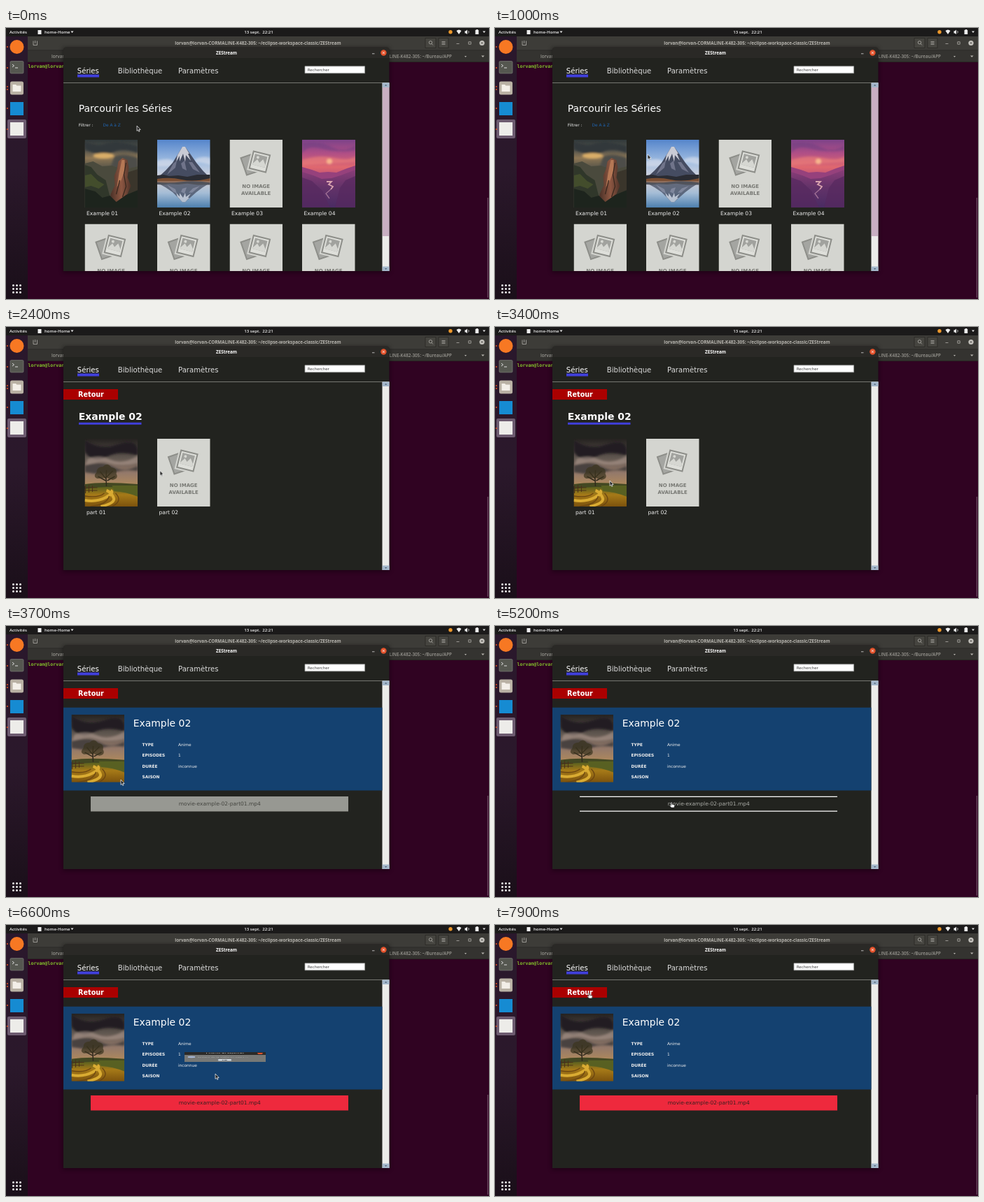
These frames come from a looping animation (690 by 388 pixels, 8 s). An HTML page:

```html
<!DOCTYPE html>
<html lang="fr">
<head>
<meta charset="utf-8">
<title>ZEStream</title>
<style>
html, body { margin: 0; width: 100%; height: 100%; overflow: hidden; background: #300322; }
svg { display: block; width: 100%; height: 100%; }
text { font-family: "DejaVu Sans", sans-serif; fill: #eee; white-space: pre; }
.ui text, text.ui { font-family: "Open Sans", "Noto Sans", sans-serif; font-weight: 600; }
.ui text.bold, text.bold { font-weight: 700; }
.mid { text-anchor: middle; }
.end { text-anchor: end; }
.bold { font-weight: 700; }
.tab { font-size: 10.1px; fill: #ddd; }
.h1 { font-size: 13.95px; fill: #fff; }
.cap { font-size: 7.6px; }
.small { font-size: 5.85px; }
.file { font-size: 7.5px; }

/* Hard switches between states */
.list, .part, .detail, .idle, .hover, .played, .arrow, .hand, .blur { animation: 8s step-end infinite; }
.list { animation-name: list; }
.part { animation-name: part; }
.detail { animation-name: detail; }
.idle { animation-name: idle; }
.hover { animation-name: hover; }
.played { animation-name: played; }
.arrow { animation-name: arrow; }
.hand { animation-name: hand; }
.blur { animation-name: blur; }
@keyframes list { 0% { opacity: 1 } 25% { opacity: 0 } }
@keyframes part { 0% { opacity: 0 } 25% { opacity: 1 } 46.2% { opacity: 0 } }
@keyframes detail { 0% { opacity: 0 } 46.2% { opacity: 1 } }
@keyframes idle { 0% { opacity: 1 } 57.5% { opacity: 0 } }
@keyframes hover { 0% { opacity: 0 } 57.5% { opacity: 1 } 81.25% { opacity: 0 } }
@keyframes played { 0% { opacity: 0 } 81.25% { opacity: 1 } }
@keyframes arrow { 0% { opacity: 1 } 22.4% { opacity: 0 } 25% { opacity: 1 } 57.5% { opacity: 0 } 73.75% { opacity: 1 } 97.5% { opacity: 0 } }
@keyframes hand { 0% { opacity: 0 } 57.5% { opacity: 1 } 73.75% { opacity: 0 } 97.5% { opacity: 1 } }
@keyframes blur { 0% { opacity: 0 } 70% { opacity: 1 } 82.4% { opacity: 0 } }

.dialog { transform-origin: 313px 189px; animation: dialog 8s linear infinite; }
@keyframes dialog {
  0%, 68.74% { transform: scaleY(0); }
  70% { transform: scaleY(.7); }
  71.25%, 81.25% { transform: scaleY(1); }
  82.4%, 83.7% { transform: scaleY(.24); }
  83.75%, 100% { transform: scaleY(0); }
}

.cursor { animation: cursor 8s linear infinite; }
@keyframes cursor {
  0%, 1.25% { transform: translate(187px, 140px); }
  11.25% { transform: translate(214px, 176px); }
  20%, 27.5% { transform: translate(242px, 209px); }
  30% { transform: translate(220px, 205.5px); }
  35%, 47.5% { transform: translate(164px, 220px); }
  57.5% { transform: translate(240px, 247px); }
  60%, 72.5% { transform: translate(252px, 252px); }
  77.5%, 81.25% { transform: translate(305px, 208px); }
  82.5%, 87.5% { transform: translate(299px, 213px); }
  91.25%, 93.75% { transform: translate(180px, 146px); }
  98.75%, 100% { transform: translate(134.5px, 97px); }
}
</style>
</head>
<body>
<svg viewBox="0 0 690 388">
<defs>
  <linearGradient id="dock" x2="0" y2="1">
    <stop stop-color="#2a182c"/><stop offset=".5" stop-color="#2b182b"/><stop offset="1" stop-color="#1a0f19"/>
  </linearGradient>
  <linearGradient id="stormSky" x2="0" y2="1">
    <stop stop-color="#30383a"/><stop offset=".16" stop-color="#58564e"/><stop offset=".27" stop-color="#8d7654"/><stop offset=".42" stop-color="#565449"/>
  </linearGradient>
  <linearGradient id="rock">
    <stop stop-color="#472f26"/><stop offset=".55" stop-color="#8d5742"/><stop offset="1" stop-color="#4e3228"/>
  </linearGradient>
  <linearGradient id="blueSky" x2="0" y2="1">
    <stop stop-color="#5585cb"/><stop offset=".55" stop-color="#a3bfe2"/><stop offset="1" stop-color="#dfd8da"/>
  </linearGradient>
  <linearGradient id="lake" x2="0" y2="1">
    <stop stop-color="#cfcbd2"/><stop offset=".45" stop-color="#a5bdd6"/><stop offset="1" stop-color="#4d7fae"/>
  </linearGradient>
  <linearGradient id="pinkSky" x2="0" y2="1">
    <stop stop-color="#7d4389"/><stop offset=".35" stop-color="#b04f86"/><stop offset=".7" stop-color="#e0686f"/><stop offset="1" stop-color="#b64c79"/>
  </linearGradient>
  <linearGradient id="purpleHill" x2="0" y2="1">
    <stop stop-color="#8a3d78"/><stop offset=".45" stop-color="#643369"/><stop offset="1" stop-color="#4a2b63"/>
  </linearGradient>
  <linearGradient id="duskSky" x2="0" y2="1">
    <stop stop-color="#252220"/><stop offset=".4" stop-color="#5f564f"/><stop offset=".72" stop-color="#94796a"/><stop offset="1" stop-color="#b18a5b"/>
  </linearGradient>
  <linearGradient id="field" x2="0" y2="1">
    <stop stop-color="#59601f"/><stop offset=".4" stop-color="#a67a18"/><stop offset="1" stop-color="#7c520d"/>
  </linearGradient>
  <filter id="soft"><feGaussianBlur stdDeviation="1.5"/></filter>
  <filter id="haze"><feGaussianBlur stdDeviation=".6"/></filter>
  <filter id="shade" x="-10%" y="-10%" width="120%" height="120%"><feGaussianBlur stdDeviation="3"/></filter>
  <clipPath id="page"><path d="M82 79H537.5V348H82z"/></clipPath>

  <symbol id="canyon" viewBox="0 0 75.5 97">
    <path fill="url(#stormSky)" d="M0 0H76V97H0z"/>
    <g filter="url(#soft)">
      <path fill="#30373a" d="M0 3Q20 10 32 5T76 9V19Q55 11 40 18T0 14z"/>
      <ellipse cx="27" cy="23" rx="15" ry="4" fill="#d9ad68"/>
      <path fill="#4d4e49" d="M42 24Q55 18 76 26V42H36z"/>
    </g>
    <g filter="url(#haze)">
      <path fill="#4a4a3d" d="M0 34L12 31 25 38 39 37 55 43 76 38V97H0z"/>
      <path fill="#30372a" d="M0 36L9 39 18 50 30 58 40 97H0z"/>
      <path fill="#434d2c" d="M0 51L9 49 19 59 28 64 20 70 9 66 0 68z"/>
      <path fill="#3a352b" d="M57 48L76 42V97H46z"/>
      <path fill="url(#rock)" d="M48 31L54 26 61 29 63 40 61 54 66 66 60 80 48 91 36 92 37 78 43 65 42 52 46 42z"/>
      <path fill="#b57855" d="M53 29L57 29 57 44 52 58 46 68 49 48z"/>
      <path fill="none" stroke="#39281f" stroke-width="1.3" d="M59 33L56 50 59 67 54 82M50 58L45 78"/>
      <path fill="#1d241d" d="M0 70L15 74 25 83 36 80 45 89 59 79 76 72V97H0z"/>
    </g>
  </symbol>

  <g id="peak">
    <path fill="#454c61" d="M0 55L12 44 22 33 30 20 36 10 40 10 47 20 56 33 65 44 76 55z"/>
    <path fill="#c9cbd5" d="M36 10L40 10 46 20 44 20 48 30 41 22 40 32 37 20 32 31 32 23 27 32 29 22z"/>
    <path fill="#70748a" d="M23 34L28 30 26 40 14 50zM45 32L50 32 61 47 51 42zM34 34L39 30 42 44 36 41z"/>
    <path fill="#2a2c33" d="M0 51L9 50 17 52 30 51 43 53 57 50 76 50V59H0z"/>
    <path fill="#7b4f33" d="M0 56Q18 53 35 57T76 55V59H0z"/>
  </g>
  <symbol id="mountain" viewBox="0 0 75.5 97">
    <path fill="url(#blueSky)" d="M0 0H76V59H0z"/>
    <path fill="#e7e6ec" opacity=".5" filter="url(#soft)" d="M0 30Q17 25 24 31T15 38H0zM54 28Q65 22 76 26V36Q62 31 54 33z"/>
    <path fill="url(#lake)" d="M0 59H76V97H0z"/>
    <g filter="url(#haze)">
      <use href="#peak"/>
      <use href="#peak" transform="matrix(1 0 0 -.62 0 95.5)" opacity=".75"/>
    </g>
  </symbol>

  <symbol id="sunset" viewBox="0 0 75.5 97">
    <path fill="url(#pinkSky)" d="M0 0H76V56H0z"/>
    <g filter="url(#soft)">
      <path fill="#6c3d82" opacity=".5" d="M0 5Q25 1 42 10T76 8V15Q49 19 28 13T0 20z"/>
      <path fill="#ee8078" opacity=".6" d="M0 29Q25 21 46 26T76 24V32Q48 33 0 37z"/>
      <circle cx="39" cy="31" r="4" fill="#f8b58d"/>
    </g>
    <g filter="url(#haze)">
      <path fill="#96417c" d="M0 39L14 43 25 47 37 46 49 47 64 41 76 37V97H0z"/>
      <path fill="url(#purpleHill)" d="M0 46L16 51 28 56 42 55 55 51 76 43V97H0z"/>
      <path fill="#56295f" opacity=".7" d="M0 54L14 59 29 73 40 97H0zM76 52L62 58 54 69 47 97H76z"/>
      <path fill="none" stroke="#d9a4af" stroke-width="1.8" d="M35 60H42L38 64 44 67 41 71"/>
      <path fill="none" stroke="#a27196" stroke-width="1.3" d="M41 71L34 77 39 84"/>
    </g>
  </symbol>

  <symbol id="tree" viewBox="0 0 75.5 97">
    <path fill="url(#duskSky)" d="M0 0H76V68H0z"/>
    <g filter="url(#soft)">
      <path fill="#201e20" d="M0 2Q23 17 47 8T76 14V24Q49 16 31 26T0 19z"/>
      <path fill="#a8948a" opacity=".65" d="M4 29Q20 22 37 30T76 24V35Q52 40 34 35T0 42z"/>
      <path fill="#4a4340" d="M0 38Q24 31 40 40T76 39V46Q56 43 43 48T0 48z"/>
    </g>
    <g filter="url(#haze)">
      <path fill="#434822" d="M0 65Q25 61 76 65V79H0z"/>
      <path fill="none" stroke="#30291c" stroke-width="1.5" d="M31 68Q30 57 31 45M31 58L22 47M31 55L40 46M30 60L19 54M32 60L43 54"/>
      <path fill="#3c351f" opacity=".72" d="M18 57Q11 54 17 48 17 40 26 40 32 33 38 41 47 42 45 50 49 57 40 59L31 56z"/>
      <path fill="url(#field)" d="M0 72Q35 65 76 74V97H0z"/>
      <path fill="#586022" d="M39 67H76V83Q59 76 42 75z"/>
      <path fill="none" stroke="#d9ab32" stroke-width="4" d="M0 88Q17 91 30 84T37 74M23 97Q45 92 41 84T31 74"/>
      <path fill="none" stroke="#6d4711" stroke-width="1.4" d="M0 82Q20 85 28 78M8 97Q32 94 35 82M39 97Q55 89 44 78"/>
      <path fill="none" stroke="#4b3019" d="M1 67V78M6 66V77M11 67V76M0 70H18M0 74H18"/>
    </g>
  </symbol>

  <symbol id="empty" viewBox="0 0 75.5 97">
    <path fill="#d4d5d0" d="M0 0H76V97H0z"/>
    <g stroke="#8d8e89" stroke-width="2">
      <path fill="#a4a5a1" transform="rotate(-19 30 36)" d="M20 22H44V48H20z"/>
      <g transform="rotate(14 43 31)">
        <path fill="#d4d5d0" stroke="#d4d5d0" stroke-width="4" d="M30 18H56V45H30z"/>
        <path fill="#dedfda" d="M31 19H55V44H31z"/>
        <path fill="#a1a29e" stroke="none" d="M34 22H52V38H34z"/>
        <path fill="#d6d7d2" stroke="none" d="M34 36L39 29 43 33 47 27 52 34V38H34z"/>
        <circle cx="39" cy="26" r="2" fill="#d6d7d2" stroke="none"/>
      </g>
    </g>
    <g class="mid bold" font-size="7">
      <text x="37.7" y="69" style="fill:#777873">NO IMAGE</text>
      <text x="37.7" y="78.5" style="fill:#777873">AVAILABLE</text>
    </g>
  </symbol>
</defs>

<!-- Desktop and terminal -->
<path fill="#300322" d="M0 0H690V388H0z"/>
<path fill="#3d3c38" d="M31 12H690V48.5H31z"/>
<path fill="#343330" d="M31 32H690V48.5H31z"/>
<path fill="#282724" d="M31 31.5H690V32.2H31zM31 48H690V49H31z"/>
<g class="ui" font-size="6.3">
  <text class="mid bold" x="360" y="23.5" style="fill:#b9b7b1">lorvan@lorvan-CORMALINE-K482-305: ~/eclipse-workspace-classic/ZEStream</text>
  <text x="65" y="42.5" style="fill:#9a9892">lorvan@lorvan-CORMALINE-K482-305: ~</text>
  <text class="end" x="637" y="42.5" style="fill:#9a9892">lorvan@lorvan-CORMALINE-K482-305: ~/Bureau/APP</text>
</g>
<g fill="none" stroke="#b4b2ac" stroke-width=".8">
  <path fill="#464540" stroke="#292824" d="M599 14.5H614V28.5H599zM618 14.5H632V28.5H618z"/>
  <path d="M39 18.5V24.5H44.5V18.5M41.7 18V22M622.5 19.5H627.5M622.5 21.5H627.5M622.5 23.5H627.5M643.5 22.5H647.5M660.8 19.8H664.2V23.2H660.8zM608 22.5L610 24.5"/>
  <circle cx="606.5" cy="20.8" r="2.2"/>
  <circle cx="680" cy="21.5" r="3.6" fill="#c9c7c2" stroke="none"/>
  <path stroke="#3d3c38" d="M678.6 20.1L681.4 22.9M681.4 20.1L678.6 22.9"/>
  <path fill="#b4b2ac" stroke="none" d="M679 39.5H683.5L681.2 42zM655 40H658L656.5 42z"/>
</g>
<text x="31.5" y="56.5" class="bold" font-size="6.6" style="font-family:'DejaVu Sans Mono',monospace;fill:#83c42c">lorvan@lorvan</text>
<path fill="#6b4860" d="M687.7 243H689V386H687.7z"/>

<!-- Top bar -->
<path fill="#1b1a1a" d="M0 0H690V12H0z"/>
<g class="ui" font-size="6.1">
  <text x="5" y="8.2">Activités</text>
  <text x="55" y="8.2">home-Home</text>
  <text class="mid" x="361" y="8.2">13 sept.  22:21</text>
</g>
<g fill="#eee">
  <path d="M45.5 3H50.5V9H45.5zM92.5 4.5H96.5L94.5 7zM681 4.5H685L683 7zM643.5 4Q647 .8 650.5 4L647 9zM655.5 4.2H657L659 2.5V9L657 7.5H655.5z"/>
  <path fill="none" stroke="#eee" stroke-width=".8" d="M660.5 4Q662 5.7 660.5 7.5"/>
  <path d="M670.5 2.8H672V2H674V2.8H675.2V9H670.5z"/>
  <circle cx="635" cy="5.7" r="2.7" fill="#ed982b"/>
</g>

<!-- Dock -->
<path fill="url(#dock)" d="M0 12H31V388H0z"/>
<rect x="2" y="131" width="27" height="27" rx="2" fill="#6d5b70"/>
<circle cx="15.5" cy="27" r="10" fill="#f77823"/>
<rect x="6" y="47.5" width="19" height="17.5" rx="1.5" fill="#555750" stroke="#858681" stroke-width=".6"/>
<path fill="none" stroke="#eee" stroke-width=".9" d="M9 52L11.5 54 9 56M13 57H17"/>
<rect x="6" y="76.5" width="19" height="19" rx="2.5" fill="#b9b1a4"/>
<path fill="#f3efe8" d="M9.5 81H14L15.5 82.5H21.5V91H9.5z"/>
<rect x="6" y="106" width="19" height="19" fill="#168bd2"/>
<rect x="6" y="135" width="19" height="19" fill="#edece9"/>
<g fill="#e65324">
  <circle cx="2" cy="27" r="1"/><circle cx="2" cy="57" r="1"/><circle cx="2" cy="84" r="1"/>
  <circle cx="2" cy="88" r="1"/><circle cx="2" cy="115" r="1"/><circle cx="2" cy="145" r="1"/>
</g>
<path fill="none" stroke="#eee" stroke-width="3" stroke-linecap="round" stroke-dasharray="0 5" d="M10.5 368.5H21M10.5 373.5H21M10.5 378.5H21"/>

<!-- Application window -->
<rect x="81" y="28" width="467" height="322" opacity=".4" filter="url(#shade)"/>
<path fill="#22231f" d="M82 348V32Q82 27.5 86.5 27.5H543Q547.5 27.5 547.5 32V348z"/>
<path fill="#2a2926" d="M82 43V32Q82 27.5 86.5 27.5H543Q547.5 27.5 547.5 32V43z"/>
<text class="ui mid bold" x="315" y="38.2" font-size="6.3" style="fill:#fff">ZEStream</text>
<path stroke="#ddd" stroke-width=".8" d="M523 36.8H526.5"/>
<circle cx="539.4" cy="35.5" r="4.2" fill="#e4532c"/>
<circle class="blur" cx="539.4" cy="35.5" r="4.2" fill="#4b4945"/>
<path stroke="#fff" stroke-width=".8" d="M537.9 34L540.9 37M540.9 34L537.9 37"/>
<text class="tab" x="101.8" y="65.2" style="fill:#fff">Séries</text>
<text class="tab" x="159.8" y="65.2">Bibliothèque</text>
<text class="tab" x="246" y="65.2">Paramètres</text>
<path fill="#403fdc" d="M102 66.5H133V70.5H102z"/>
<path fill="#fff" stroke="#999" stroke-width=".8" d="M427 54.8H512.6V64.8H427z"/>
<text x="430.7" y="61.8" font-size="5.5" style="fill:#444">Rechercher</text>
<path fill="#777872" d="M82 78H547.5V78.9H82z"/>
<path fill="#ececea" d="M537.5 78.5H547.5V348H537.5z"/>
<path class="list" fill="#c8afc2" d="M538 85H547V298H538z"/>
<path fill="#a4b7cb" d="M537.8 78.5H547.5V85H537.8zM537.8 341.5H547.5V348H537.8z"/>
<path fill="#536578" d="M541 82.7H544.4L542.7 80.8zM541 344H544.4L542.7 346z"/>

<g clip-path="url(#page)">
  <g class="list">
    <text class="h1" x="103.8" y="119.7">Parcourir les Séries</text>
    <text class="small" x="103.8" y="141">Filtrer :</text>
    <text class="small" x="138.5" y="141" style="fill:#2065b3">De A à Z</text>
    <use href="#canyon" x="112.5" y="160" width="75.5" height="97"/>
    <use href="#mountain" x="216" y="160" width="75.5" height="97"/>
    <use href="#empty" x="319.5" y="160" width="75.5" height="97"/>
    <use href="#sunset" x="423" y="160" width="75.5" height="97"/>
    <text class="cap" x="115" y="268.3">Example 01</text>
    <text class="cap" x="218.5" y="268.3">Example 02</text>
    <text class="cap" x="322" y="268.3">Example 03</text>
    <text class="cap" x="425.5" y="268.3">Example 04</text>
    <use href="#empty" x="112.5" y="280.5" width="75.5" height="97"/>
    <use href="#empty" x="216" y="280.5" width="75.5" height="97"/>
    <use href="#empty" x="319.5" y="280.5" width="75.5" height="97"/>
    <use href="#empty" x="423" y="280.5" width="75.5" height="97"/>
  </g>

  <g class="part">
    <g id="back">
      <path fill="#aa0000" d="M82 89H160V104H82z"/>
      <text class="mid bold" x="121.5" y="99.9" font-size="9.65" style="fill:#fff">Retour</text>
    </g>
    <text class="h1 bold" x="103.8" y="133">Example 02</text>
    <path fill="#403fdc" d="M104 136.8H193.5V139.8H104z"/>
    <use href="#tree" x="112.5" y="160" width="75.5" height="97"/>
    <use href="#empty" x="216" y="160" width="75.5" height="97"/>
    <text class="cap" x="115" y="268.3">part 01</text>
    <text class="cap" x="218.5" y="268.3">part 02</text>
  </g>

  <g class="detail">
    <use href="#back"/>
    <path fill="#144170" d="M82 116.7H537.5V235.5H82z"/>
    <use href="#tree" x="93.5" y="126.8" width="75.5" height="97"/>
    <text class="h1" x="181.7" y="143.7">Example 02</text>
    <g class="bold">
      <text class="small" x="194.5" y="172.4">TYPE</text>
      <text class="small" x="194.5" y="187.4">EPISODES</text>
      <text class="small" x="194.5" y="202.6">DURÉE</text>
      <text class="small" x="194.5" y="217.6">SAISON</text>
    </g>
    <text class="small" x="246" y="172.4">Anime</text>
    <text class="small" x="246" y="187.4">1</text>
    <text class="small" x="246" y="202.6">inconnue</text>
    <g class="idle">
      <path fill="#979892" d="M121 244H489V265.5H121z"/>
      <text class="file mid" x="305.3" y="257.4" style="fill:#454641">movie-example-02-part01.mp4</text>
    </g>
    <g class="hover">
      <path fill="#fff" d="M121 243.8H489V245.1H121zM121 264.4H489V265.7H121z"/>
      <text class="file mid" x="305.3" y="257.4" style="fill:#aaaba6">movie-example-02-part01.mp4</text>
    </g>
    <g class="played">
      <path fill="#ee293d" d="M121 244H489V265.5H121z"/>
      <text class="file mid" x="305.3" y="257.4" style="fill:#3b2020">movie-example-02-part01.mp4</text>
    </g>
  </g>
</g>

<g class="dialog">
  <path fill="#777876" d="M255 160H371V218H255z"/>
  <path fill="#2b2a28" d="M255 160H371V175H255z"/>
  <text class="ui mid bold" x="313" y="169.5" font-size="5.5">Lecture de l'épisode</text>
  <circle cx="363" cy="167.5" r="4" fill="#e4532c"/>
  <ellipse cx="265" cy="189" rx="5.5" ry="6" fill="#a6b6d5"/>
  <text x="274" y="191" font-size="4.7">Lecture de la vidéo en cours ...</text>
  <path fill="#d2d9df" stroke="#778899" stroke-width=".6" d="M303 202H322V212H303z"/>
  <text class="mid bold" x="312.5" y="209" font-size="5" style="fill:#333">OK</text>
</g>

<g class="cursor" stroke-linejoin="round">
  <path class="arrow" fill="#222" stroke="#fff" stroke-width=".7" d="M0 0V7.4L1.7 5.9 2.8 8.4 4 7.8 2.9 5.5H5.2z"/>
  <path class="hand" fill="#fff" stroke="#222" stroke-width=".6" d="M-.7 .6Q0-.4 .8 .6V3.2L4 3.9Q4.8 4.2 4.6 5.2L4 8H-.2L-2.6 5Q-2.4 4-1.5 4.5L-.7 5.2z"/>
</g>
</svg>
</body>
</html>
```
